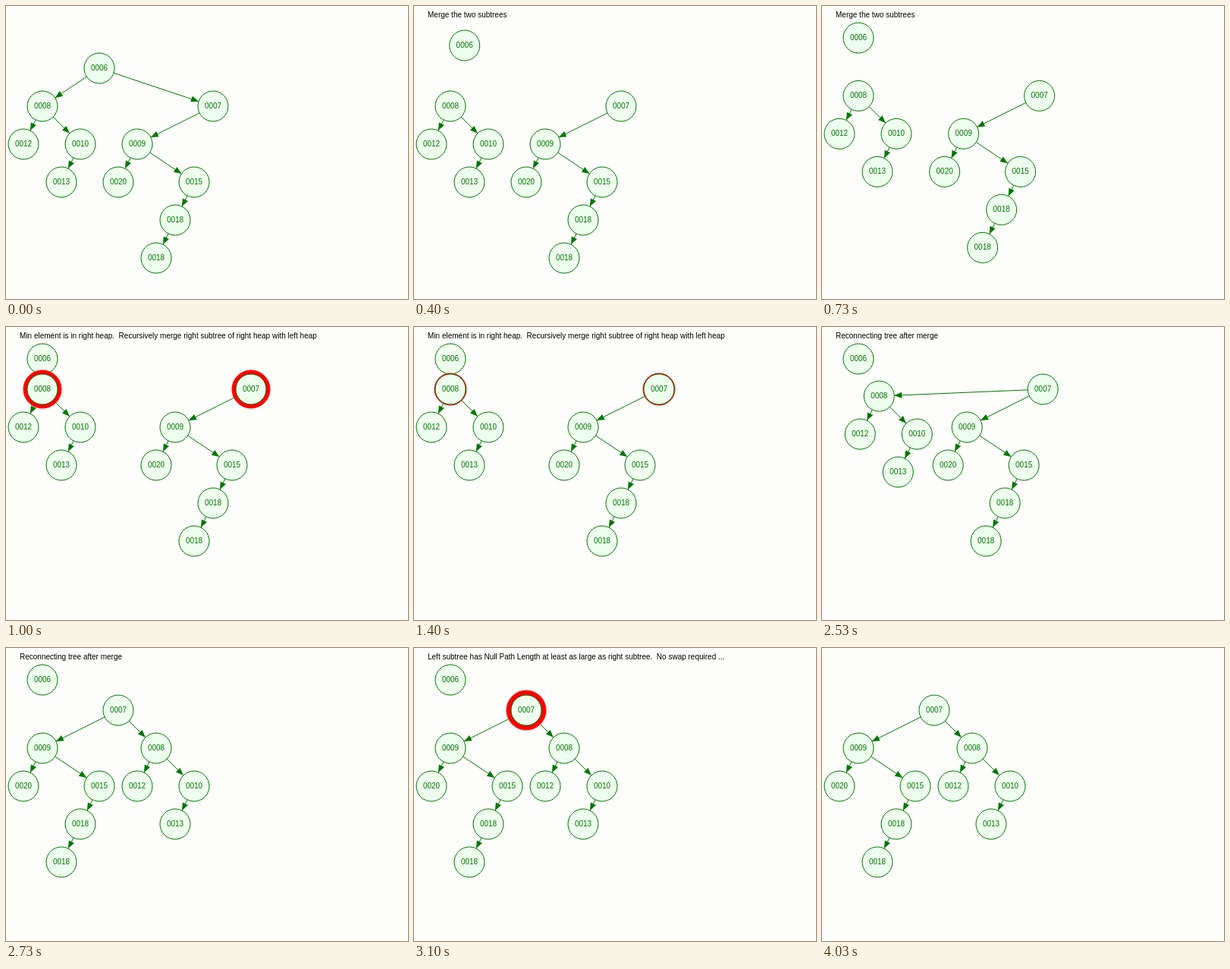
These frames come from a looping animation (530 px wide and 386 px high, 5.21 s). An HTML page with a canvas:

```html
<!DOCTYPE html>
<html lang="en">
<head>
<meta charset="utf-8">
<title>Heap merge</title>
<style>
  html, body { margin: 0; width: 100%; height: 100%; overflow: hidden; background: #fdfdfb; }
  canvas { display: block; }
</style>
</head>
<body>
<canvas id="stage" width="530" height="386"></canvas>
<script>
const ctx = document.getElementById('stage').getContext('2d');
const LOOP = 5210, FRAME = 100 / 3, TICK = 22, STEPS = 11, R = 20;
const PAPER = '#fdfdfb', GREEN = '#007700', FILL = '#eeffee', RED = '#ff0000';

// Each node: label, offset from the tree's root, index of its parent.
const TREE_8 = [
  ['0008', 0, 0], ['0012', -25, 50, 0], ['0010', 50, 50, 0], ['0013', 25, 100, 2]
];
const TREE_7 = [
  ['0007', 0, 0], ['0009', -100, 50, 0], ['0020', -125, 100, 1],
  ['0015', -25, 100, 1], ['0018', -50, 150, 3], ['0018', -75, 200, 4]
];

const MESSAGES = [
  [0, ''],
  [30, 'Merge the two subtrees'],
  [933, 'Min element is in right heap.  Recursively merge right subtree of right heap with left heap'],
  [2000, 'Reconnecting tree after merge'],
  [2766, 'Left subtree has Null Path Length at least as large as right subtree.  No swap required ...'],
  [3600, '']
];

const SPLIT = 675, COMPARE = 933, DESCEND = 1600, JOIN = 2000, REFLOW = 2500,
      CHECK = 2766, CHECKED = 3330, CLEAR = 3600;

const within = (t, a, b) => t >= a && t < b;
const mix = (a, b, k) => a.map((v, i) => v + (b[i] - v) * k);

// Moves advance in equal ticks.
function progress(t, start) {
  if (t < start) return 0;
  return Math.min(STEPS, Math.floor((t - start) / TICK) + 1) / STEPS;
}

function route(t, a, b, c) {
  return t < REFLOW ? mix(a, b, progress(t, SPLIT)) : mix(b, c, progress(t, REFLOW));
}

// Ring width swings between 0 and 7 over 14 ticks.
function pulse(t) {
  return Math.abs((Math.floor(t / TICK) - 1) % 14 - 7);
}

function disc(x, y, r, fill, stroke, width = 1) {
  ctx.beginPath();
  ctx.arc(x, y, r, 0, Math.PI * 2);
  if (fill) { ctx.fillStyle = fill; ctx.fill(); }
  ctx.strokeStyle = stroke;
  ctx.lineWidth = width;
  ctx.stroke();
}

function write(text, x, y, color, align) {
  ctx.font = '10px "Liberation Sans", Arial, sans-serif';
  ctx.textBaseline = 'middle';
  ctx.textAlign = align;
  ctx.fillStyle = color;
  ctx.fillText(text, x, y);
}

function edge([x1, y1], [x2, y2]) {
  const d = Math.hypot(x2 - x1, y2 - y1);
  const ux = (x2 - x1) / d, uy = (y2 - y1) / d;
  const tx = x2 - ux * R, ty = y2 - uy * R;
  ctx.strokeStyle = ctx.fillStyle = GREEN;
  ctx.lineWidth = 1;
  ctx.beginPath();
  ctx.moveTo(x1 + ux * R, y1 + uy * R);
  ctx.lineTo(tx, ty);
  ctx.stroke();
  ctx.beginPath();
  ctx.moveTo(tx, ty);
  ctx.lineTo(tx - ux * 10 - uy * 4, ty - uy * 10 + ux * 4);
  ctx.lineTo(tx - ux * 10 + uy * 4, ty - uy * 10 - ux * 4);
  ctx.fill();
}

function node(label, [x, y], ring) {
  if (ring !== null) disc(x, y, R + ring, RED, RED);
  disc(x, y, R, FILL, GREEN);
  write(label, x, y, GREEN, 'center');
}

function tree(nodes, [x, y], ring, faded) {
  const at = nodes.map(n => [x + n[1], y + n[2]]);
  ctx.globalAlpha = faded ? 0.6 : 1;
  nodes.forEach((n, i) => { if (i) edge(at[n[3]], at[i]); });
  ctx.globalAlpha = faded ? 0.5 : 1;
  nodes.forEach((n, i) => node(n[0], at[i], i ? null : ring));
  ctx.globalAlpha = 1;
}

function draw(time) {
  const t = Math.floor((time + 3.4) / FRAME) * 100 / 3;
  ctx.fillStyle = PAPER;
  ctx.fillRect(0, 0, 530, 386);

  const top = mix([123, 82], [48, 42], Math.min(1, t / 533));
  const eight = route(t, [48, 132], [48, 82], [198, 132]);
  const seven = route(t, [273, 132], [323, 82], [148, 82]);
  const comparing = within(t, COMPARE, DESCEND);
  const descending = within(t, DESCEND, JOIN);
  const ring8 = comparing ? pulse(t) : null;
  const ring7 = comparing || within(t, CHECK, CHECKED) ? pulse(t) : null;

  if (t < 30) {
    edge(top, eight);
    edge(top, seven);
  }
  if (t >= JOIN) edge(seven, eight);
  if (t < CLEAR) node('0006', top, null);
  tree(TREE_8, eight, ring8, false);
  tree(TREE_7, seven, ring7, descending);

  if (descending) {
    const [x, y] = mix([323, 82], [348, 132], progress(t, DESCEND));
    disc(x, y, R, null, GREEN, 4);
    disc(48, 82, R, null, GREEN, 4);
  }

  const message = MESSAGES.filter(m => t >= m[0]).pop()[1];
  write(message, 18, 12, '#000', 'left');
}

const began = performance.now();
function loop() {
  draw((performance.now() - began) % LOOP);
  requestAnimationFrame(loop);
}
loop();
</script>
</body>
</html>
```
